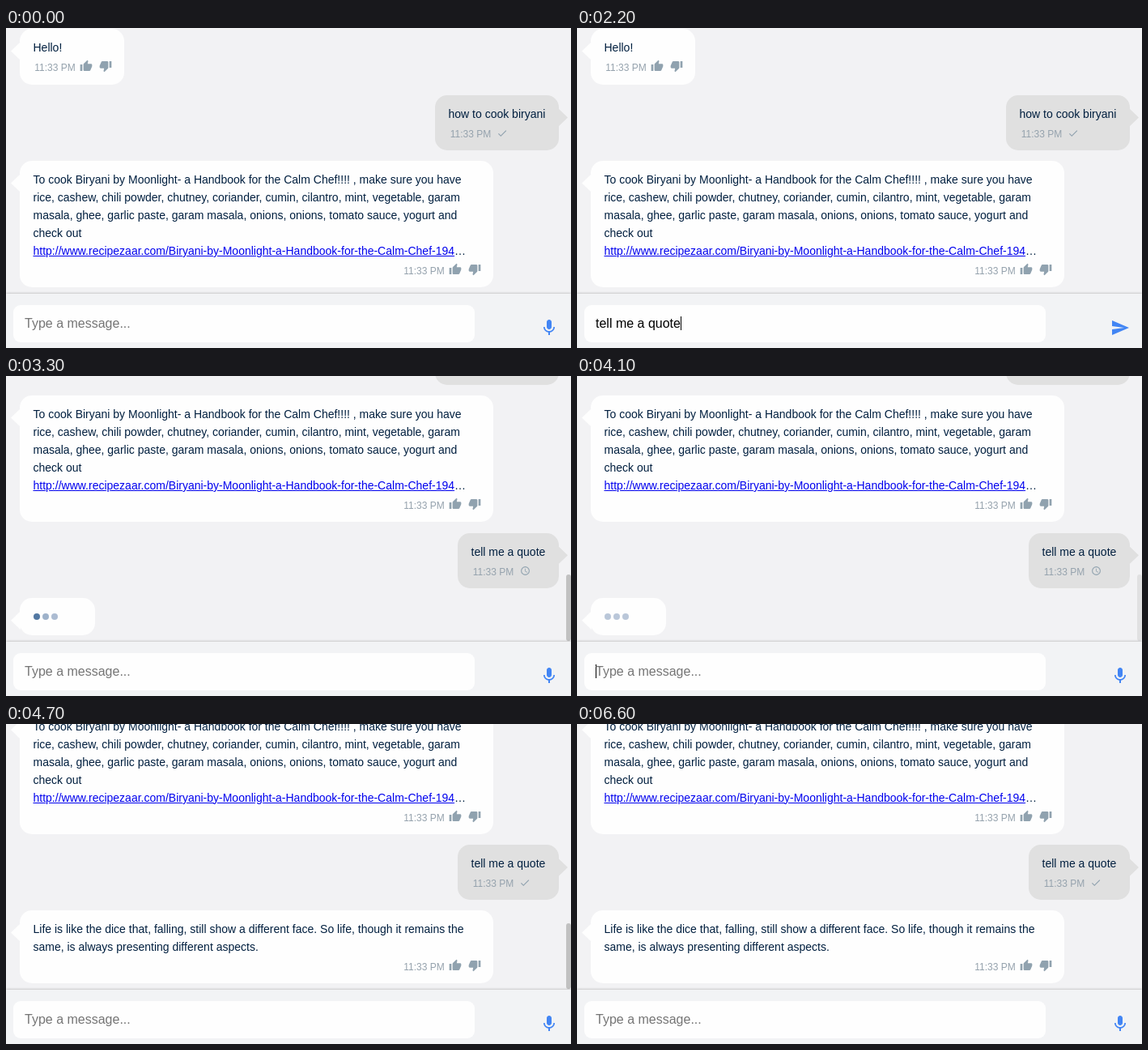
Write an HTML page that moves like this. It is 698 px wide and 395 px high and loops after 6.8 s.

```html
<!DOCTYPE html>
<html lang="en">
<head>
<meta charset="utf-8">
<title>Chat</title>
<style>
html, body { margin: 0; width: 100%; height: 100%; overflow: hidden; background: #f2f2f4; }
body { position: relative; font: 14px/22px "Liberation Sans", Arial, sans-serif; color: #001f3f; }
body *, .msg::before { position: absolute; white-space: pre; }
.msg { border-radius: 15px; background: #fefefe; }
.msg::before { content: ""; left: -11px; top: 16px; width: 12px; height: 23px; background: inherit;
  clip-path: polygon(100% 0, 0 50%, 100% 100%); }
.msg.me { background: #e0e0e0; }
.msg.me::before { left: auto; right: -11px; clip-path: polygon(0 0, 100% 50%, 0 100%); }
.text { left: 16.5px; top: 12px; }
.text a { position: static; color: #00e; text-decoration: underline; }
.time { font-size: 12px; line-height: 14px; color: #95a2ad; }
svg { fill: #90a2af; }
.dot { top: 19px; width: 8px; height: 8px; border-radius: 50%; }
#thumb { left: 692px; width: 6px; border-radius: 3px; background: #c1c1c1; }
#bar { left: 0; top: 328px; width: 100%; height: 67px; background: #f2f3f5; box-shadow: 0 0 3px rgba(0, 0, 0, .32); }
#box { left: 9px; top: 14px; width: 570px; height: 46px; border-radius: 9px; background: #fefefe; }
#field { left: 14px; top: 14px; font-size: 16px; line-height: 17px; color: #000; }
#field * { position: static; }
#caret { display: inline-block; width: 1px; height: 17px; margin-right: -1px; background: #000; vertical-align: top; }
#hint { color: #757575; }
#bar svg { fill: #4285f4; }
</style>
</head>
<body>
<div id="log"></div>
<div id="thumb"></div>
<div id="bar">
  <div id="box"><div id="field"><span id="typed"></span><span id="caret"></span><span id="hint">Type a message...</span></div></div>
</div>
<script>
const LOOP = 6800;
const PATHS = {
  thumb: "M1 21h4V9H1v12zm22-11c0-1.1-.9-2-2-2h-6.31l.95-4.57.03-.32c0-.41-.17-.79-.44-1.06L14.17 1 7.59 7.59C7.22 7.95 7 8.45 7 9v10c0 1.1.9 2 2 2h9c.83 0 1.54-.5 1.84-1.22l3.02-7.05c.09-.23.14-.47.14-.73V10z",
  done: "M9 16.17L4.83 12l-1.42 1.41L9 19 21 7l-1.41-1.41z",
  clock: "M12 2a10 10 0 1 0 0 20 10 10 0 0 0 0-20zm0 18a8 8 0 1 1 0-16 8 8 0 0 1 0 16zM12.5 7H11v6l5.25 3.15.75-1.23-4.5-2.67z",
  mic: "M12 14c1.66 0 3-1.34 3-3V5c0-1.66-1.34-3-3-3S9 3.34 9 5v6c0 1.66 1.34 3 3 3zm5.3-3c0 3-2.54 5.1-5.3 5.1S6.7 14 6.7 11H5c0 3.41 2.72 6.23 6 6.72V21h2v-3.28c3.28-.48 6-3.3 6-6.72h-1.7z",
  send: "M2.01 21L23 12 2.01 3 2 10l15 2-15 2z"
};
const $ = id => document.getElementById(id);
const clamp = x => Math.max(0, Math.min(1, x));

function icon(name, cx, cy, size, flip) {
  return `<svg class="${name}" viewBox="0 0 24 24" width="${size}" height="${size}" style="left:${cx - size / 2}px;top:${cy - size / 2}px">` +
    `<path d="${PATHS[name]}"${flip ? ' transform="rotate(180 12 12)"' : ""}/></svg>`;
}

function bubble(cls, x, y, w, h, html) {
  const el = document.createElement("div");
  el.className = "msg " + cls;
  el.style.cssText = `left:${x}px;top:${y}px;width:${w}px;height:${h}px`;
  el.innerHTML = html;
  el.y = y;
  $("log").append(el);
  return el;
}

const time = (x, y) => `<div class="time" style="left:${x}px;top:${y}px">11:33 PM</div>`;

function bot(y, w, h, lines) {
  const base = 22 * lines.length;
  return bubble("", 17, y, w, h, `<div class="text">${lines.join("\n")}</div>` + time(w - 110.8, base + 19) +
    icon("thumb", w - 47.3, base + 24.3, 16) + icon("thumb", w - 23, base + 24.3, 16, true));
}

function me(x, y, text) {
  return bubble("me", x, y, 683 - x, 68, `<div class="text">${text}</div>` + time(18.7, 41) +
    icon("done", 83, 47, 14) + icon("clock", 83, 47, 13));
}

const ask = "tell me a quote";
const keyTimes = [200, 300, 500, 700, 900, 1100, 1300, 1300, 1500, 1600, 1800, 1900, 2000, 2100, 2200];
const blinks = [200, 3300, 3900, 4500, 5100, 5600, 6200, 6600];

bot(1, 129, 69, ["Hello!"]);
me(530, 83, "how to cook biryani").querySelector(".clock").remove();
bot(164, 585, 156, [
  "To cook Biryani by Moonlight- a Handbook for the Calm Chef!!!! , make sure you have",
  "rice, cashew, chili powder, chutney, coriander, cumin, cilantro, mint, vegetable, garam",
  "masala, ghee, garlic paste, garam masala, onions, onions, tomato sauce, yogurt and",
  "check out",
  "<a>http://www.recipezaar.com/Biryani-by-Moonlight-a-Handbook-for-the-Calm-Chef-194</a>…"
]);
const sent = me(558, 333.7, ask);
const typing = bubble("", 17, 414.2, 93, 46, [17, 28, 39].map(x => `<div class="dot" style="left:${x}px"></div>`).join(""));
const reply = bot(414.3, 585, 90, [
  "Life is like the dice that, falling, still show a different face. So life, though it remains the",
  "same, is always presenting different aspects."
]);
const dots = typing.querySelectorAll(".dot");
$("bar").insertAdjacentHTML("beforeend", icon("mic", 671, 42, 24) + icon("send", 671, 42, 24));

const show = (el, on) => el.style.display = on ? "" : "none";

// Fade in while sliding up by 10px
function enter(el, t, start, from, to) {
  const p = clamp((t - start) / 330);
  show(el, t >= from && t < to);
  el.style.opacity = p;
  el.style.top = el.y + 10 * (1 - p) + "px";
}

function render(t) {
  $("log").style.top = (t < 2600 ? 0 : t < 4500 ? -140 : -184.3) + "px";
  enter(sent, t, 2400, 2600, LOOP);
  enter(typing, t, 2430, 2600, 4500);
  enter(reply, t, 4290, 4500, LOOP);
  show(sent.querySelector(".clock"), t < 4500);
  show(sent.querySelector(".done"), t >= 4500);

  dots.forEach((dot, i) => {
    const near = Math.min(...[2600, 3300].map(peak => Math.abs(t - peak - 220 * i)));
    const k = clamp(1 - near / 300);
    dot.style.background = `rgb(${186 - 104 * k},${199 - 79 * k},${217 - 55 * k})`;
  });

  const late = t >= 4500;
  const thumb = $("thumb").style;
  thumb.opacity = late ? clamp(Math.min((t - 4350) / 250, (5800 - t) / 300))
                       : clamp(Math.min((t - 2600) / 200, (4200 - t) / 300));
  thumb.top = (late ? 246 : 245) + "px";
  thumb.height = (late ? 81 : 82) + "px";

  const count = t < 2600 ? keyTimes.filter(k => k <= t).length : 0;
  $("typed").textContent = ask.slice(0, count);
  show($("hint"), !count);
  $("caret").style.opacity = blinks.filter(b => b <= t).length % 2;
  show(document.querySelector(".mic"), !count);
  show(document.querySelector(".send"), count);
}

function frame() {
  render(Math.floor(performance.now() % LOOP / 100) * 100);
  requestAnimationFrame(frame);
}
frame();
</script>
</body>
</html>
```
